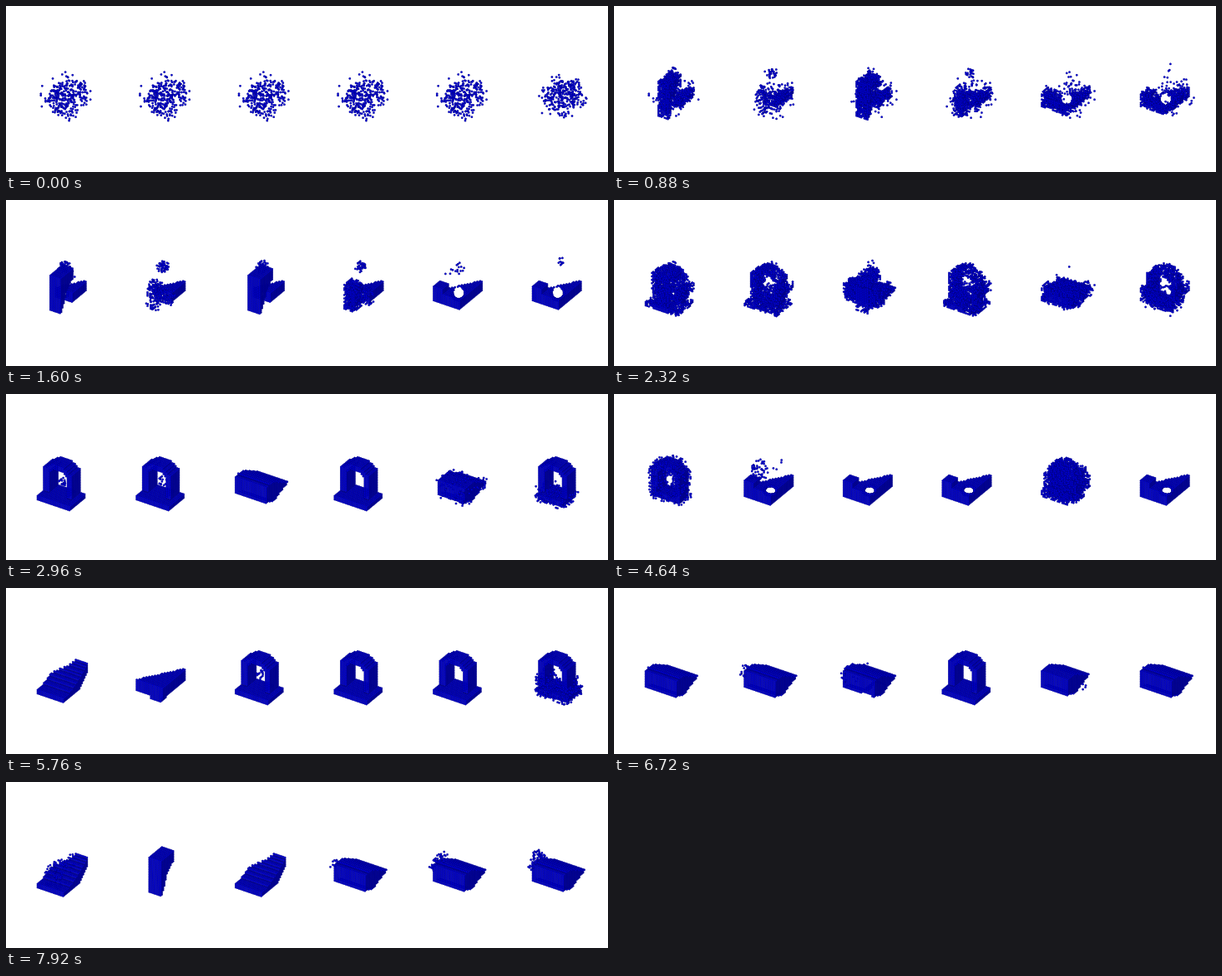
Recreate the animation shown at these times as a matplotlib script. Size 721 px wide and 200 px high, loop 8000 ms.

```python
import numpy as np
import matplotlib.pyplot as plt
from matplotlib.animation import FuncAnimation

WIDTH, HEIGHT, FRAMES, INTERVAL = 721, 200, 100, 80
PITCH = 118.6
STEP = 0.05

# Voxel grid: u runs right, v runs back, w runs up.
side = np.arange(-2, 22) * STEP
U, V, W = np.meshgrid(side, side, side, indexing="ij")
X = 38 + 38 * U + 30 * V
Y = 127 + 13 * U - 25 * V - 41 * W
EPS = 1e-6


def between(a, low, high):
    return (a >= low - EPS) & (a <= high + EPS)


def box(u0, u1, v0, v1, w0, w1):
    return between(U, u0, u1) & between(V, v0, v1) & between(W, w0, w1)


def disc(x, y, rx, ry):
    return ((X - x) / rx) ** 2 + ((Y - y) / ry) ** 2 < 1


def blob(u, v, w, r, p):
    return p * ((U - u) ** 2 + (V - v) ** 2 + (W - w) ** 2 < r * r)


def mix(*fields):
    return np.maximum.reduce([np.asarray(f, float) for f in fields])


def grow(shape, n=2):
    out = shape.copy()
    for _ in range(n):
        padded = np.pad(out, 1)
        for axis in range(3):
            for d in (-1, 1):
                out = out | np.roll(padded, d, axis)[1:-1, 1:-1, 1:-1]
    return out


def fuzzy(shape, p, region=True):
    return mix(shape, p * (grow(shape) & region))


def make_arch():
    top = np.interp(U, [0, .25, .6, .85], [.8, .97, .97, .8])
    body = box(0, .85, .25, .62, 0, 1) & (W <= top)
    hole_top = np.interp(U, [.15, .3, .6, .75], [.68, .82, .82, .68])
    hole = between(U, .18, .72) & (W > .11) & (W < hole_top)
    return body & ~hole


def make_barrel():
    top = np.interp(V, [0, .1, .3, .85], [.66, .7, .68, .3])
    bottom = np.interp(V, [0, .3, .85], [.2, .06, .26])
    return box(0, .95, 0, .85, 0, 1) & between(W, bottom, top)


def make_ramp():
    top = .12 + .5 * np.clip(V, 0, 1) ** 1.9
    bottom = np.interp(V, [0, .65, 1], [0, 0, .3])
    plan = box(0, .8, 0, .96, 0, 1) & (U >= 1.2 * (V - .58))
    return plan & between(W, bottom, top)


def make_slab():
    depth = np.interp(W, [0, .2, .45, .7, 1], [.05, .18, .22, .5, .52])
    return box(.4, .75, 0, 1, 0, 1) & (V <= depth)


arch_body = make_arch()
plate = box(0, 1, 0, .62, 0, .12)
arch = arch_body | plate
barrel, ramp, slab = make_barrel(), make_ramp(), make_slab()
wedge = box(0, .8, 0, .92, .1, .4) & (U >= .85 * V - .03)
footed = wedge | box(.45, .75, 0, .2, 0, .1)
hump = box(0, .25, 0, .25, .1, .55)
holed = (wedge | hump) & ~disc(69, 116, 6.5, 4.5)
ringed = (wedge | hump) & (W > .14) & ~disc(68, 112, 7, 7)
arm = wedge & (V > .35) & (W > .14) & ~disc(70, 113, 3, 3)
cap = blob(.35, .6, .88, .16, .35)
crumbs = blob(.45, .45, .42, .13, .3)
left_dust = blob(-.06, .08, .6, .16, .25)
back_dust = blob(.05, .25, .72, .17, .25)


def noise(seed):
    chance = np.random.default_rng(seed).random(U.shape)
    density = .042 * disc(77, 114, 26, 25) + .013 * disc(71, 110, 33, 33)
    return (chance < density) & box(0, 1, 0, 1, 0, .75)


def column(p):
    return mix(p * box(.3, .6, 0, .3, 0, .7), cap, .3 * (grow(arm) & (V < .5)))


# Each row holds the occupancy of the six panels at one time.
KEY_FRAMES = [0, 20, 37, 58, 72, 84, 99]
KEYS = [
    [noise(s) for s in (4, 4, 4, 4, 4, 9)],
    [mix(slab & (U < .72), arm, cap, blob(.6, .6, .75, .15, .1)),
     mix(arm, column(.25)),
     mix(slab, arm, cap, blob(.9, .4, .4, .2, .03)),
     mix(arm, column(.6)),
     mix(ringed, blob(.35, .6, .85, .15, .2), blob(.1, .4, .8, .15, .1)),
     mix(ringed, blob(.35, .7, .98, .12, .25))],
    [mix(arch, crumbs), mix(arch, crumbs), barrel, arch,
     fuzzy(barrel & (U > .1) & (W < .62), .15),
     fuzzy(arch_body | box(.1, .85, .1, .62, 0, .1), .2, W < .25)],
    [fuzzy(arch_body, .2),
     mix(holed, blob(.15, .4, .65, .28, .16), blob(.5, .75, .7, .2, .06)),
     holed, holed,
     mix(.6 * (arch_body | wedge), .35 * box(0, .8, .1, .8, .1, .7)),
     holed],
    [ramp, footed, mix(arch, crumbs), arch, arch,
     fuzzy(mix(arch_body, box(.1, 1, .1, .62, 0, .12), crumbs) > .5, .25,
           W < .4)],
    [barrel, mix(barrel, left_dust),
     fuzzy(barrel & ~box(.6, .85, 0, .5, 0, .2), .15, U < .1),
     arch,
     mix(barrel & (U < .85) & (W < .66), blob(.95, .5, .15, .17, .12)),
     barrel],
    [fuzzy(ramp, .22, (V > .3) & (U < .5)), slab, ramp,
     mix(barrel, left_dust), mix(barrel, left_dust, back_dust),
     mix(barrel, left_dust, back_dust, blob(-.05, .2, .8, .15, .3))],
]
KEYS = [[np.asarray(f, float) for f in row] for row in KEYS]
THRESHOLDS = np.random.default_rng(21).random((6,) + U.shape)
ORDER = np.argsort((.43 * U - .75 * V + .5 * W).ravel(), kind="stable")

# Colours of voxels seen from the right only, from above, from the front.
SHADES = np.array([(0, 0, .6), (0, 0, .78), (0, 0, .88)])


def occupancy(frame, panel):
    k = min(np.searchsorted(KEY_FRAMES, frame, side="right") - 1,
            len(KEY_FRAMES) - 2)
    s = (frame - KEY_FRAMES[k]) / (KEY_FRAMES[k + 1] - KEY_FRAMES[k])
    t = np.clip((s - .15) / .7, 0, 1)
    t = t * t * (3 - 2 * t)
    density = (1 - t) * KEYS[k][panel] + t * KEYS[k + 1][panel]
    flicker = np.random.default_rng(1000 * panel + frame).random(U.shape)
    return density > .8 * THRESHOLDS[panel] + .2 * flicker


def panel_dots(frame, panel):
    """Positions and shades, back to front, of the voxels not fully covered."""
    solid = occupancy(frame, panel)
    padded = np.pad(solid, 1)

    def neighbour(du, dv, dw):
        n = len(side)
        return padded[1 + du:1 + du + n, 1 + dv:1 + dv + n, 1 + dw:1 + dw + n]

    covered = np.logical_and.reduce([neighbour(du, dv, dw) for du in (0, 1)
                                     for dv in (0, -1) for dw in (0, 1)])
    shade = np.where(~neighbour(0, -1, 0), 2,
                     np.where(~neighbour(0, 0, 1), 1, 0))
    shown = ORDER[(solid & ~covered).ravel()[ORDER]]
    points = np.column_stack([X.ravel()[shown] + panel * PITCH,
                              Y.ravel()[shown]])
    return points, SHADES[shade.ravel()[shown]]


fig = plt.figure(figsize=(WIDTH / 100, HEIGHT / 100), dpi=100,
                 facecolor="white")
ax = fig.add_axes([0, 0, 1, 1])
ax.set_xlim(0, WIDTH)
ax.set_ylim(HEIGHT, 0)
ax.axis("off")
dots = ax.scatter([], [], s=2.6, edgecolors=[(0, 0, .5)], linewidths=.3)


def update(frame):
    points, shades = zip(*(panel_dots(frame, p) for p in range(6)))
    dots.set_offsets(np.vstack(points))
    dots.set_facecolor(np.vstack(shades))
    return (dots,)


anim = FuncAnimation(fig, update, frames=FRAMES, interval=INTERVAL,
                     repeat=True, repeat_delay=0)
plt.show()
```
